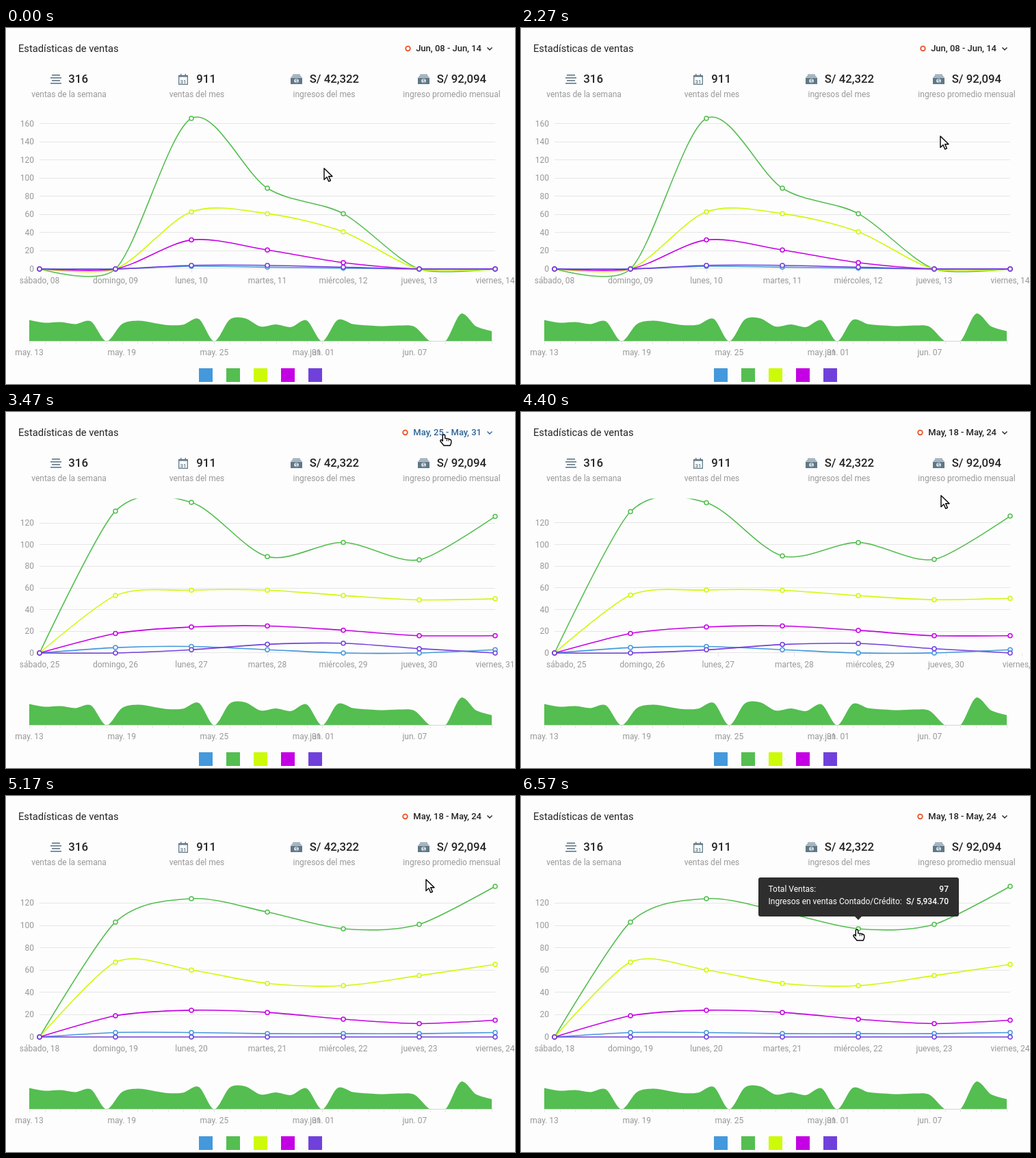
Write an HTML page with a canvas that moves like this. It is 744 by 520 pixels and loops after 6610 ms.

```html
<!DOCTYPE html>
<html lang="es">
<head>
<meta charset="utf-8">
<title>Estadísticas de ventas</title>
<style>
html, body { margin: 0; width: 100%; height: 100%; overflow: hidden; background: #fdfdfd; }
canvas { display: block; }
</style>
</head>
<body>
<canvas id="stage" width="744" height="520"></canvas>
<script>
const ctx = document.getElementById('stage').getContext('2d');
const LOOP = 6610, EASE_MS = 750, TRAVEL_MS = 600;
const LEFT = 49, RIGHT = 715, STEP = 111, BASE = 352, HEIGHT = 220;
const PAPER = '#fdfdfd', DARK = '#242424', MUTED = '#989898', GRID = '#e6e6e6', ICON = '#607888';
const COLORS = ['#4498dc', '#54be50', '#ccfa08', '#c400e4', '#7040dc'];
const DAYS = ['sábado', 'domingo', 'lunes', 'martes', 'miércoles', 'jueves', 'viernes'];

// Daily sales from May 13; both charts read them
const sales = [129, 112, 116, 104, 120, 0, 103, 124, 112, 97, 101, 135, 0, 131, 139, 89,
  102, 86, 126, 0, 129, 104, 95, 91, 95, 87, 0, 0, 166, 89, 61];

const mix = (a, b, k) => a + (b - a) * k;
const clamp = k => Math.min(1, Math.max(0, k));
const cubic = k => k < .5 ? 4 * k ** 3 : 1 - 4 * (1 - k) ** 3;
const yOf = (value, week) => BASE - value * HEIGHT / week.max;
const dateOf = day => String(day > 18 ? day - 18 : day + 13).padStart(2, 0);

// The smaller series swing around a mean: [mean, swing, peak day]
function makeWeek(at, start, label, blue, yellow, magenta, purple) {
  const total = DAYS.map((_, i) => sales[start + i] || 0);
  const wave = ([mean, swing, peak]) => total.map((v, i) =>
    v && Math.max(0, Math.round(mean + swing * Math.cos((i - peak) * 1.12))));
  return { at, start, label, max: Math.max(...total),
    rows: [wave(blue), total, wave(yellow), wave(magenta), wave(purple)] };
}

const weeks = [
  makeWeek(-EASE_MS, 26, 'Jun, 08 - Jun, 14', [2, 1, 2], [45, 20, 2.4], [18, 14, 1.8], [2, 2, 2.4]),
  makeWeek(2308, 12, 'May, 25 - May, 31', [3, 3, 1.7], [54, 5, 2.5], [20, 5, 2.7], [4, 5, 3.6]),
  makeWeek(4268, 5, 'May, 18 - May, 24', [3.5, 1, .9], [56, 11, .9], [18, 6, 2.3], [0, 0, 0])
];

// arrival time, x, y
const stops = [[0, 465, 205], [1050, 634, 20], [2150, 613, 158], [3350, 640, 33],
  [4150, 614, 122], [6050, 491, 195]];

const arrow = new Path2D('M0 0V16.5L4 12.8L6.7 19L9.4 17.8L6.7 11.7H12Z');
const hand = new Path2D('M-1.7 1.5Q-1.7 0 0 0T1.7 1.5V5.5Q6 5.5 9 7Q10.8 7.6 10.8 9.5V12L9.3 16H0' +
  'L-5 9.8Q-5.5 7.4 -3.6 7.6L-1.7 9.4Z');

function text(str, x, y, { size = 12, weight = 400, color = MUTED, align = 'left' } = {}) {
  ctx.font = `${weight} ${size}px Roboto, sans-serif`;
  ctx.fillStyle = color;
  ctx.textAlign = align;
  ctx.fillText(str, x, y);
}

function box(x, y, w, h, color) {
  ctx.fillStyle = color;
  ctx.fillRect(x, y, w, h);
}

function stroke(color, width, path) {
  ctx.strokeStyle = color;
  ctx.lineWidth = width;
  path ? ctx.stroke(path) : ctx.stroke();
}

function ring(x, y, r, color, width) {
  ctx.beginPath();
  ctx.arc(x, y, r, 0, 7);
  ctx.fillStyle = PAPER;
  ctx.fill();
  stroke(color, width);
}

function clipped(x, y, w, h, draw) {
  ctx.save();
  ctx.beginPath();
  ctx.rect(x, y, w, h);
  ctx.clip();
  draw();
  ctx.restore();
}

// Cardinal spline with quadratic end segments
function spline(points) {
  const last = points.length - 1;
  const handle = (i, k) => points[i].map((v, axis) =>
    v + k * .15 * (points[i + 1][axis] - points[i - 1][axis]));
  ctx.beginPath();
  ctx.moveTo(...points[0]);
  ctx.quadraticCurveTo(...handle(1, -2 / 3), ...points[1]);
  for (let i = 2; i < last; i++)
    ctx.bezierCurveTo(...handle(i - 1, 1), ...handle(i, -1), ...points[i]);
  ctx.quadraticCurveTo(...handle(last - 1, 2 / 3), ...points[last]);
}

function drawHeader(label, hover) {
  const color = hover ? '#2f6698' : DARK;
  text('Estadísticas de ventas', 18, 35, { size: 14.7, color: DARK });
  text(label, 695, 34, { size: 13, weight: 500, color, align: 'right' });
  ring(695 - Math.round(ctx.measureText(label).width) - 11.5, 30, 3.3, '#ea5424', 1.8);
  ctx.beginPath();
  ctx.moveTo(703.5, 28.5);
  ctx.lineTo(707, 32);
  ctx.lineTo(710.5, 28.5);
  stroke(color, 1.4);
}

function listIcon(x) {
  for (let i = 0; i < 4; i++) {
    const inset = i % 2 ? 0 : 2;
    box(x + inset, 68 + i * 4, 16 - 2 * inset, 1.6, ICON);
  }
}

function calendarIcon(x) {
  ctx.strokeStyle = ICON;
  ctx.lineWidth = 1.3;
  ctx.strokeRect(x + .7, 69.7, 12.6, 12.6);
  box(x, 69, 14, 2.5, ICON);
  box(x + 3, 67, 1.5, 3, ICON);
  box(x + 9.5, 67, 1.5, 3, ICON);
  text('31', x + 7, 80.5, { size: 8, weight: 500, color: ICON, align: 'center' });
}

function moneyIcon(x) {
  box(x + 3, 68, 11, 1.2, ICON);
  box(x + 1.5, 70.3, 14, 1.2, ICON);
  box(x, 72.5, 17, 9.5, ICON);
  ring(x + 8.5, 77.2, 3, '#d4dce0', .8);
  text('$', x + 8.5, 80, { size: 7, weight: 700, color: ICON, align: 'center' });
}

function drawStats() {
  [[listIcon, 65, '316', 92, 'ventas de la semana'],
   [calendarIcon, 252, '911', 279, 'ventas del mes'],
   [moneyIcon, 416, 'S/ 42,322', 465, 'ingresos del mes'],
   [moneyIcon, 602, 'S/ 92,094', 651.5, 'ingreso promedio mensual']
  ].forEach(([icon, x, value, center, note]) => {
    icon(x);
    text(value, x + (icon === moneyIcon ? 27.7 : 26.3), 80, { size: 16.8, weight: 500, color: DARK });
    text(note, center, 101, { align: 'center' });
  });
}

function drawAxes(from, to, k) {
  clipped(0, 127, 744, 260, () => {
    for (let v = 0; v <= Math.max(from.max, to.max); v += 20) {
      const y = mix(yOf(v, from), yOf(v, to), k);
      ctx.globalAlpha = mix(v <= from.max, v <= to.max, k);
      box(LEFT, Math.ceil(y) - 1, RIGHT - LEFT, 1, GRID);
      text(v, 41, Math.round(y) + 4, { align: 'right' });
    }
  });
  const start = mix(from.start, to.start, k);
  const drawWeek = (week, alpha) => DAYS.forEach((name, i) => {
    const x = LEFT + STEP * (week.start + i - start);
    ctx.globalAlpha = alpha;
    box(Math.round(x), BASE, 1, 5, GRID);
    text(`${name}, ${dateOf(week.start + i)}`, x, 373, { align: 'center' });
  });
  drawWeek(from, 1 - k);
  drawWeek(to, k);
  ctx.globalAlpha = 1;
}

function drawLines(from, to, k) {
  clipped(0, 126.5, 744, 260, () => {
    const rows = to.rows.map((row, r) => row.map((v, i) =>
      [LEFT + STEP * i, mix(yOf(from.rows[r][i], from), yOf(v, to), k)]));
    rows.forEach((points, r) => {
      spline(points);
      stroke(COLORS[r], 1.6);
    });
    rows.forEach((points, r) => points.forEach(([x, y]) => ring(x, y, 3, COLORS[r], 1.5)));
  });
}

function drawMonth() {
  const dayX = i => 34 + i * 676 / 30;
  clipped(34, 400, 676.5, 57.5, () => {
    spline(sales.map((v, i) => [dayX(i), 457.5 - v * .241]));
    ctx.lineTo(710, 458);
    ctx.lineTo(34, 458);
    ctx.fillStyle = COLORS[1];
    ctx.fill();
  });
  box(34, 457, 677, 1, '#d0d8d0');
  sales.forEach((_, i) => box(Math.round(dayX(i)), 458, 1, 4, GRID));
  [0, 6, 12, 18, 19, 25].forEach(i =>
    text(`${i > 18 ? 'jun' : 'may'}. ${dateOf(i)}`, dayX(i), 478, { align: 'center' }));
  COLORS.forEach((color, i) => box(282 + 40 * i, 497, 20, 20, color));
}

function drawTooltip(alpha) {
  ctx.globalAlpha = alpha;
  ctx.fillStyle = '#2e2e2e';
  ctx.beginPath();
  ctx.roundRect(347, 119, 293, 57, 3);
  ctx.moveTo(488, 176);
  ctx.lineTo(493, 181);
  ctx.lineTo(498, 176);
  ctx.fill();
  [['Total Ventas:', '97', 140], ['Ingresos en ventas Contado/Crédito:', 'S/ 5,934.70', 158]]
    .forEach(([name, value, y]) => {
      text(name, 361.5, y, { color: '#fff' });
      text(value, 625, y, { weight: 500, color: '#fff', align: 'right' });
    });
  ctx.globalAlpha = 1;
}

function pointerAt(t) {
  return stops.reduce(([x, y], [arrive, nextX, nextY]) => {
    const k = cubic(clamp((t - arrive) / TRAVEL_MS + 1));
    return [mix(x, nextX, k), mix(y, nextY, k)];
  }, [0, 0]);
}

function drawPointer(x, y, shape) {
  ctx.save();
  ctx.translate(x, y);
  ctx.fillStyle = '#fff';
  ctx.lineJoin = 'round';
  ctx.fill(shape);
  stroke('#000', 1.4, shape);
  if (shape === hand) [3.8, 6.6].forEach(dx => box(dx, 6.5, 1, 3, '#000'));
  ctx.restore();
}

function render(t) {
  const n = weeks.findLastIndex(w => t >= w.at);
  const to = weeks[n], from = weeks[Math.max(0, n - 1)];
  const k = cubic(clamp((t - to.at) / EASE_MS));
  const [x, y] = pointerAt(t);
  const onDate = x > 576 && x < 716 && y > 16 && y < 44;
  const tip = clamp((t - 6000) / 150);

  box(0, 0, 744, 520, PAPER);
  drawHeader(to.label, onDate);
  drawStats();
  drawAxes(from, to, k);
  drawLines(from, to, k);
  drawMonth();
  drawTooltip(tip);
  drawPointer(x, y, onDate || tip ? hand : arrow);
}

function tick() {
  render(performance.now() % LOOP);
  requestAnimationFrame(tick);
}
tick();
</script>
</body>
</html>
```
